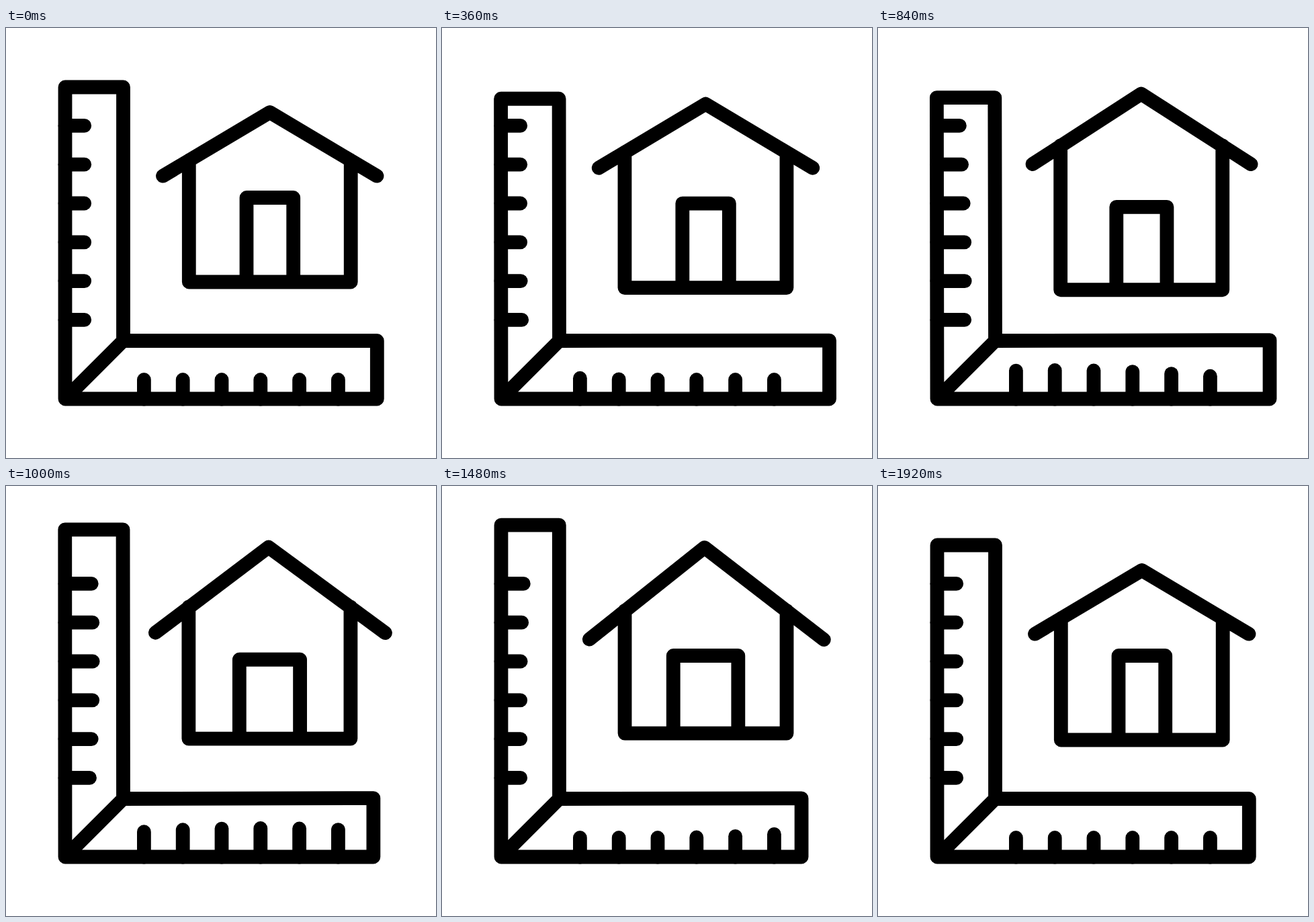
These frames come from a looping animation (640 by 640 pixels, 2 s). An HTML page without scripts:

```html
<!DOCTYPE html>
<html lang="en">
<head>
<meta charset="utf-8">
<title>House and set square</title>
<style>
  html, body { margin: 0; width: 100%; height: 100%; overflow: hidden; background: #fff; }
  svg { display: block; width: 100vw; height: 100vh; }

  path {
    fill: none;
    stroke: #000;
    stroke-width: 20.8px;
    stroke-linecap: round;
    stroke-linejoin: round;
    animation: 2s cubic-bezier(.45, 0, .55, 1) infinite;
  }

  .ruler { animation-name: ruler; }
  .house { animation-name: house; }

  /* Ticks swell one after another, from the corner outwards */
  .tick { stroke-linecap: butt; animation-delay: calc(var(--i) * 80ms); stroke-linecap: round; }
  .side .tick { d: path("M0 0H28.7"); animation-name: side; }
  .base .tick { d: path("M0 0H28.5"); animation-name: base; }

  @keyframes ruler {
    0%, 8%, 90.5%, 100% {
      d: path("M88 88H174.5L174.5 465.5L552.3 465.5V552H88ZL174.5 465.5M88 552L174.5 465.5");
      d: path("M88 88L174.5 88L174.5 465.5L552.3 465.5L552.3 552L88 552ZM88 552L174.5 465.5");
    }
    28%, 32.5% {
      d: path("M87.2 122.2L173.7 122.2L174.5 465.5L600.3 464.6L600.3 552L88 552ZM88 552L174.5 465.5");
    }
    60.5%, 62.5% {
      d: path("M88 42.5L174.2 42.5L174.5 465.5L526 464.6L526 552L88 552ZM88 552L174.5 465.5");
    }
  }

  /* walls, door, roof */
  @keyframes house {
    0%, 4%, 94.5%, 100% {
      d: path("M272.3 197L272.3 378L513.2 378L513.2 197M358 378L358 252.5L427.7 252.5L427.7 378M233.5 220.2L392.7 125.5L552 220.2");
    }
    32%, 33.5% {
      d: path("M271.6 173L271.6 395L512.7 395L512.7 173M357.7 395L357.7 269.5L427 269.5L427 395M233 196.5L392 100.8L551.5 196.5");
    }
    61.5%, 66.5% {
      d: path("M272 183.5L272 366.4L513 366.4L513 183.5M342 366.4L342 252.5L443 252.5L443 366.4M217 229.5L390.3 86L571 230");
    }
  }

  @keyframes side {
    0%, 10%, 66%, 100% { d: path("M0 0H28.7"); }
    38% { d: path("M0 0H41.2"); }
  }

  @keyframes base {
    0%, 10%, 66%, 100% { d: path("M0 0H28.5"); }
    38% { d: path("M0 0H42.5"); }
  }
</style>
</head>
<body>
<svg viewBox="0 0 640 640" role="img" aria-label="House beside a set square">
  <path class="ruler" d="M88 88L174.5 88L174.5 465.5L552.3 465.5L552.3 552L88 552ZM88 552L174.5 465.5"/>
  <path class="house" d="M272.3 197L272.3 378L513.2 378L513.2 197M358 378L358 252.5L427.7 252.5L427.7 378M233.5 220.2L392.7 125.5L552 220.2"/>

  <g class="side" transform="translate(88 434.4)">
    <path class="tick" style="--i:0"/>
    <path class="tick" style="--i:1" transform="translate(0 -57.8)"/>
    <path class="tick" style="--i:2" transform="translate(0 -115.6)"/>
    <path class="tick" style="--i:3" transform="translate(0 -173.4)"/>
    <path class="tick" style="--i:4" transform="translate(0 -231.2)"/>
    <path class="tick" style="--i:5" transform="translate(0 -289)"/>
  </g>

  <g class="base" transform="translate(205.4 552) rotate(-90)">
    <path class="tick" style="--i:0"/>
    <path class="tick" style="--i:1" transform="translate(0 57.8)"/>
    <path class="tick" style="--i:2" transform="translate(0 115.6)"/>
    <path class="tick" style="--i:3" transform="translate(0 173.4)"/>
    <path class="tick" style="--i:4" transform="translate(0 231.2)"/>
    <path class="tick" style="--i:5" transform="translate(0 289)"/>
  </g>
</svg>
</body>
</html>
```
